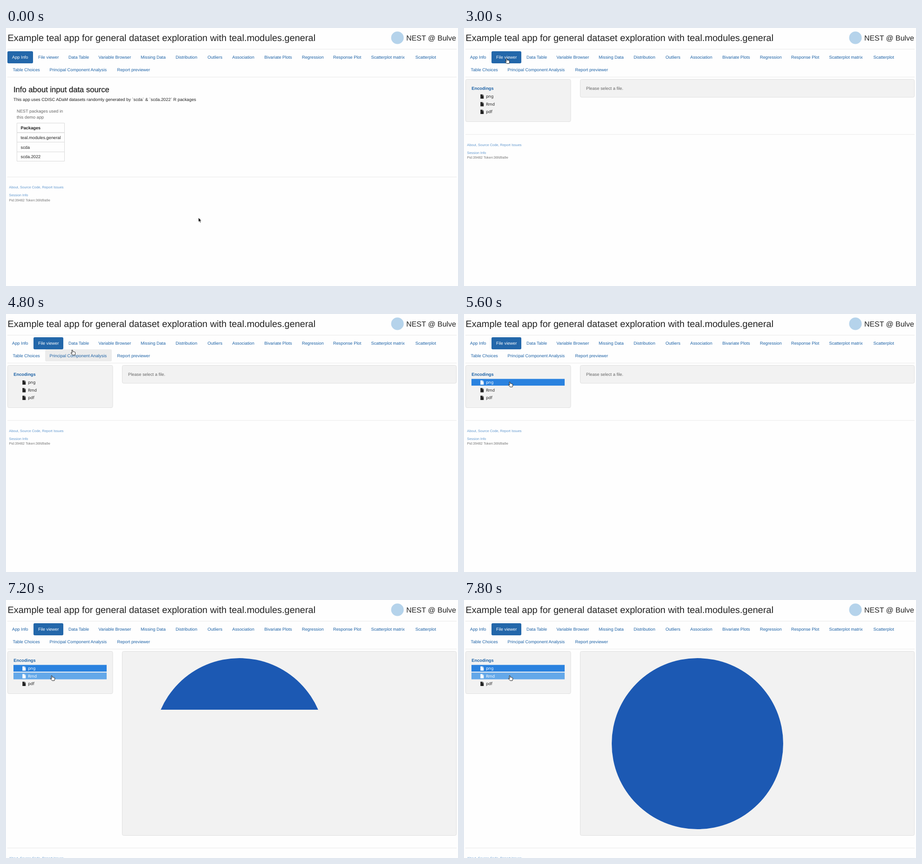
Recreate the animation shown at these times as an HTML page. Size 970 by 555 pixels, loop 8000 ms.

```html
<!DOCTYPE html>
<html lang="en">
<head>
<meta charset="utf-8">
<title>Teal app demo</title>
<style>
html, body { margin: 0; width: 100%; height: 100%; overflow: hidden; background: #fefefe; }
svg { display: block; width: 970px; height: 555px; }
text { font: 9.28px "Liberation Sans", Arial, sans-serif; fill: #222; text-rendering: geometricPrecision; white-space: pre; }
.title { font-size: 19.95px; }
.brand { font-size: 15.9px; }
.heading { font-size: 16.6px; stroke: #222; stroke-width: .3px; }
.link { fill: #1d62a6; }
.bold { font-weight: bold; }
.muted { fill: #666; }
.white { fill: #fff; }
.small { font-size: 7.44px; fill: #777; }
.small.pale { fill: #6399cf; }
.file { font: 8.7px "Noto Sans", "Open Sans", sans-serif; }
.rule { stroke: #e9e9e9; }
.grid { stroke: #d9d9d9; fill: none; }
.well { fill: #f2f2f2; stroke: #e0e0e0; }
</style>
</head>
<body>
<svg id="stage" viewBox="0 0 970 555">
  <defs><clipPath id="reveal"><rect id="revealBox" x="249" y="110" width="718" height="0"/></clipPath></defs>
  <text class="title" x="3.5" y="27.5">Example teal app for general dataset exploration with teal.modules.general</text>
  <circle cx="840" cy="21" r="13.5" fill="#b5d3eb"/>
  <text class="brand" x="859" y="26.7">NEST @ Bulve</text>
  <path class="rule" d="M3 45.5H967M3 105.5H967"/>
  <g id="tabs"></g>

  <g id="info">
    <text class="heading" x="16" y="137.7">Info about input data source</text>
    <text x="16" y="157">This app uses CDISC ADaM datasets randomly generated by `scda` &amp; `scda.2022` R packages</text>
    <text class="muted" x="23" y="182">NEST packages used in</text>
    <text class="muted" x="23" y="195">this demo app</text>
    <path class="grid" d="M23.5 204.5H125.5V286.5H23.5ZM23.5 245.5H125.5M23.5 266.5H125.5"/>
    <path class="grid" stroke-width="1.4" d="M23.5 225H125.5"/>
    <text class="bold" x="31.5" y="217.7">Packages</text>
    <text x="31.5" y="239">teal.modules.general</text>
    <text x="31.5" y="259.6">scda</text>
    <text x="31.5" y="280">scda.2022</text>
  </g>

  <g id="viewer">
    <rect class="well" x="3.5" y="110.5" width="225.5" height="91" rx="3"/>
    <text class="link bold" x="16.3" y="132.8">Encodings</text>
    <g id="files"></g>
    <rect class="well" id="well" x="249.5" y="110.5" width="717" height="38.5" rx="3"/>
    <text class="muted" id="prompt" x="262" y="132.8">Please select a file.</text>
    <circle cx="501" cy="309" r="184" fill="#1c59b3" clip-path="url(#reveal)"/>
  </g>

  <g id="footer">
    <path class="rule" d="M3 .5H967"/>
    <text class="small pale" x="6.5" y="25">About, Source Code, Report Issues</text>
    <text class="small pale" x="6.5" y="42.2">Session Info</text>
    <text class="small" x="6.5" y="52.8">Pid:39482 Token:36fd9a9e</text>
  </g>

  <g id="cursor" stroke-linejoin="round">
    <path id="arrow" fill="#000" stroke="#fff" stroke-width=".7" d="M0 0V9.2L2.1 7.3L3.6 10.8L5.2 10.1L3.7 6.7H6.5Z"/>
    <path id="hand" fill="#fff" stroke="#111" stroke-width=".9" d="M-.9 .6Q0 -.6 .9 .6L1.7 4Q2.6 3.1 3.3 4Q4.3 3.3 4.9 4.3Q6 3.8 6.4 5L6.7 8L5.8 11H1L-2.4 7.2Q-3.1 5.7 -1.6 6L-.1 7.2Z"/>
  </g>
</svg>
<script>
const LOOP = 8000, STEP = 200;
const OPEN_VIEWER = 2800, PICK_PNG = 5600, HOVER_RMD = 6000, LOADING = 6200, RESIZE = 7000, LOADED = 7400;
const $ = id => document.getElementById(id);

function add(parent, tag, attrs, content = '') {
  const node = document.createElementNS('http://www.w3.org/2000/svg', tag);
  for (const key in attrs) node.setAttribute(key, attrs[key]);
  node.textContent = content;
  parent.append(node);
  return node;
}
const show = (node, on) => node.setAttribute('visibility', on ? 'visible' : 'hidden');

const tabRows = [
  [66.2, [['App Info', 13], ['File viewer', 69], ['Data Table', 134], ['Variable Browser', 198.5],
    ['Missing Data', 289], ['Distribution', 364], ['Outliers', 432.5], ['Association', 485.5],
    ['Bivariate Plots', 554.5], ['Regression', 635], ['Response Plot', 702],
    ['Scatterplot matrix', 783.5], ['Scatterplot', 878.5]]],
  [92.6, [['Table Choices', 14.5], ['Principal Component Analysis', 93.5], ['Report previewer', 238.5]]]
];
const tabBox = (x, y, width) => add($('tabs'), 'rect', { x, y, width, height: 26, rx: 2.7 });
const infoTab = tabBox(3, 50, 55);
const fileTab = tabBox(59, 50, 64);
const pcaTab = tabBox(84, 76, 143);
pcaTab.setAttribute('fill', '#ececec');

const labels = {};
for (const [y, row] of tabRows)
  for (const [name, x] of row) labels[name] = add($('tabs'), 'text', { x, y, class: 'link' }, name);

const files = ['png', 'Rmd', 'pdf'].map((name, i) => {
  const y = 139.6 + 16.5 * i;
  const bar = add($('files'), 'rect', { x: 16, y, width: 200, height: 14.5 });
  const icon = add($('files'), 'path', { d: `M35.3 ${y + 3.2}h4.2v2.7h2.7v6.5h-6.9zM40.1 ${y + 3.2}l2.1 2.1h-2.1z` });
  const label = add($('files'), 'text', { x: 47.2, y: y + 10.8, class: 'file' }, name);
  return color => {
    show(bar, !!color);
    bar.setAttribute('fill', color || 'none');
    icon.setAttribute('fill', color ? '#fff' : '#222');
    label.setAttribute('class', color ? 'file white' : 'file');
  };
});

// time, x, y of the pointer tip
const path = [
  [0, 413, 408], [800, 413, 408], [1200, 342, 333], [1600, 220, 200], [2000, 108, 80], [2200, 98, 69],
  [2600, 91, 65.5], [4200, 91, 65.5], [4800, 142, 77.3], [5000, 138, 92], [5400, 98, 146],
  [5600, 98, 146], [6000, 98, 162.5], [LOOP, 98, 162.5]
];
function pointerAt(t) {
  const i = path.findIndex(p => p[0] > t);
  const [t0, x0, y0] = path[i - 1], [t1, x1, y1] = path[i];
  const k = (t - t0) / (t1 - t0);
  return [x0 + (x1 - x0) * k, y0 + (y1 - y0) * k];
}

function paintTab(box, label, active, hovered) {
  show(box, active || hovered);
  box.setAttribute('fill', active ? '#2367aa' : '#ececec');
  label.setAttribute('class', active ? 'white' : 'link');
}

function draw(t) {
  const viewing = t >= OPEN_VIEWER, resized = t >= RESIZE;
  show($('info'), !viewing);
  $('viewer').style.display = viewing ? '' : 'none';
  paintTab(infoTab, labels['App Info'], !viewing, false);
  paintTab(fileTab, labels['File viewer'], viewing, t >= 2400);
  show(pcaTab, t === 4800 || t === 5000);

  files[0](t >= PICK_PNG ? '#2a82df' : t >= 5400 ? '#64a8e9' : '');
  files[1](t >= HOVER_RMD ? '#64a8e9' : '');
  files[2]('');

  $('well').setAttribute('height', resized ? 396 : 38.5);
  show($('prompt'), viewing && !resized);
  $('prompt').setAttribute('opacity', t > LOADING ? .3 : t === LOADING ? .4 : 1);
  $('revealBox').setAttribute('height', t >= LOADED ? 396 : resized ? 126 : 0);
  $('footer').setAttribute('transform', `translate(0 ${resized ? 533 : viewing ? 228.5 : 320})`);

  const [x, y] = pointerAt(t);
  const pointing = t >= 2200 && t !== 5200;
  $('cursor').setAttribute('transform', `translate(${x} ${y})`);
  show($('arrow'), !pointing);
  show($('hand'), pointing);
}

const start = performance.now();
function tick() {
  const t = (performance.now() - start) % LOOP;
  draw(Math.floor(t / STEP) * STEP);
  requestAnimationFrame(tick);
}
tick();
</script>
</body>
</html>
```
